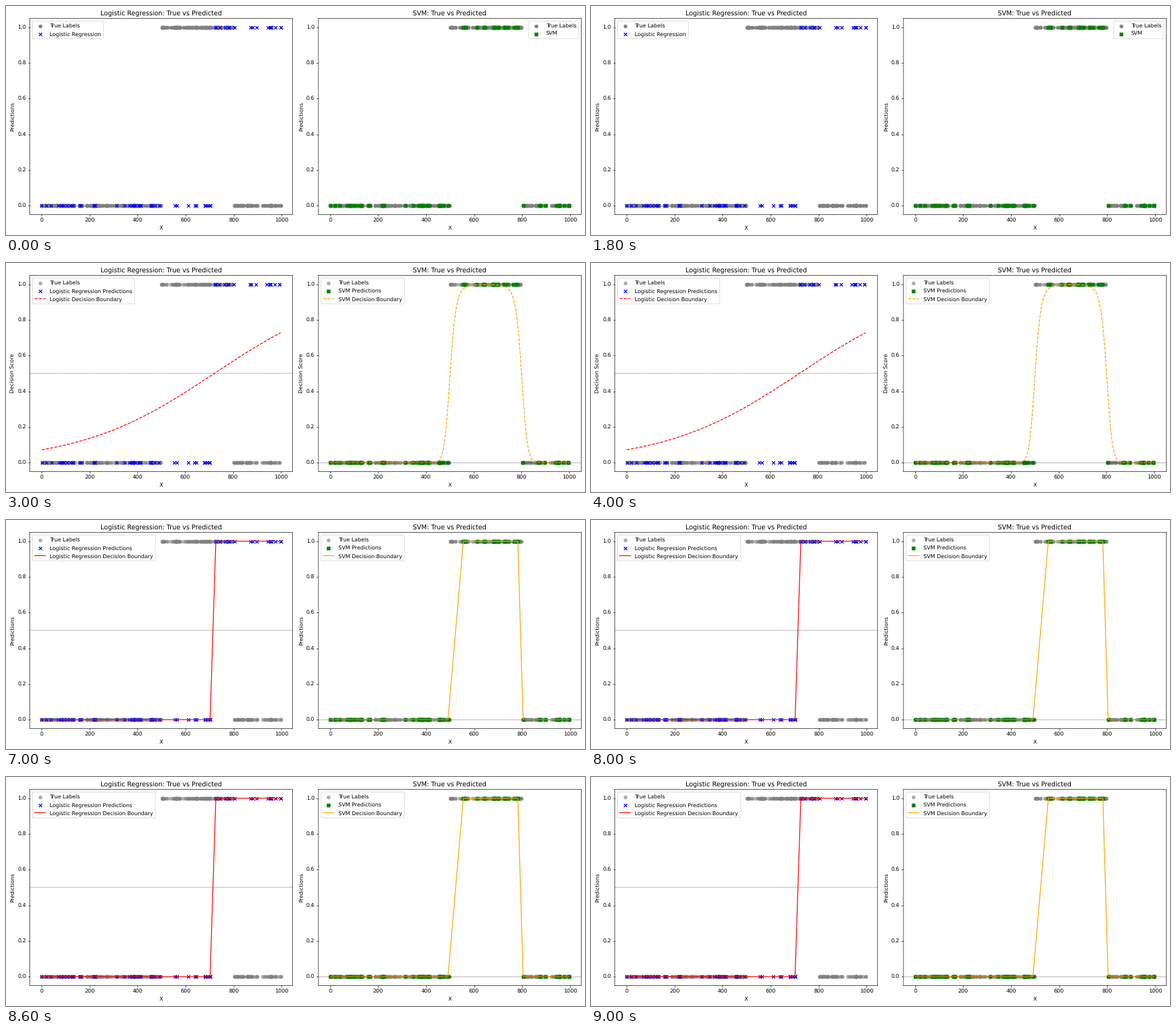
A matplotlib script for the animation above (10000 ms loop, 864x342 px).

```python
import numpy as np
import matplotlib.pyplot as plt
from matplotlib.animation import FuncAnimation

W, H, DPI = 864, 342, 58
plt.rcParams.update({"font.family": "DejaVu Sans", "font.size": 10,
                     "text.hinting": "none", "legend.labelspacing": 0.55})

# Random samples, labelled 1 in the middle band, with a 20% hold-out part
COUNT = 300
x = np.random.RandomState(42).randint(0, 1000, COUNT)
truth = ((x >= 500) & (x <= 800)).astype(int)
held = np.sort(x[np.random.RandomState(42).permutation(COUNT)[:COUNT // 5]])
grid = np.linspace(0, 1000, 500)


def sigmoid(t):
    return 1 / (1 + np.exp(-t))


def logistic(t):
    return sigmoid(0.00354 * (t - 722))


def svm(t):
    return sigmoid(6 * (1 - ((t - 651) / 149.5) ** 2))


MODELS = [
    dict(name="Logistic Regression", short="Logistic", score=logistic,
         marker="x", color="blue", line="red", level=0.5),
    dict(name="SVM", short="SVM", score=svm,
         marker="s", color="green", line="orange", level=0),
]

fig = plt.figure(figsize=((W + 0.001) / DPI, (H + 0.001) / DPI), dpi=DPI)
TOP, BOTTOM, WIDTH = 18.4, 311.5, 392.2
axes = [fig.add_axes([left / W, 1 - BOTTOM / H, WIDTH / W, (BOTTOM - TOP) / H])
        for left in (35.5, 466.1)]


def draw_panel(ax, model, stage):
    ax.clear()
    name = model["name"]
    guess = (model["score"](held) > 0.5).astype(int)
    ax.scatter(x, truth, color="gray", label="True Labels",
               alpha=1 if stage == "points" else 0.6)
    ax.scatter(held, guess, color=model["color"], marker=model["marker"],
               label=name if stage == "points" else name + " Predictions")
    if stage == "curve":
        ax.plot(grid, model["score"](grid), "--", color=model["line"],
                label=model["short"] + " Decision Boundary")
    elif stage == "steps":
        ax.plot(held, guess, color=model["line"],
                label=name + " Decision Boundary")
    if stage != "points":
        ax.axhline(model["level"], color="black", ls="--", lw=0.5)
    ax.set_title(name + ": True vs Predicted")
    ax.set_xlabel("X")
    ax.set_ylabel("Decision Score" if stage == "curve" else "Predictions")
    right = stage == "points" and name == "SVM"
    ax.legend(loc="upper right" if right else "upper left")
    # keep sub-pixel places for markers, frames and ticks
    for part in ax.findobj():
        part.set_snap(False)


def update(second):
    stage = "points" if second < 3 else "curve" if second < 7 else "steps"
    for ax, model in zip(axes, MODELS):
        draw_panel(ax, model, stage)


anim = FuncAnimation(fig, update, frames=10, interval=1000,
                     init_func=lambda: update(0), repeat=True, repeat_delay=0)
plt.show()
```
